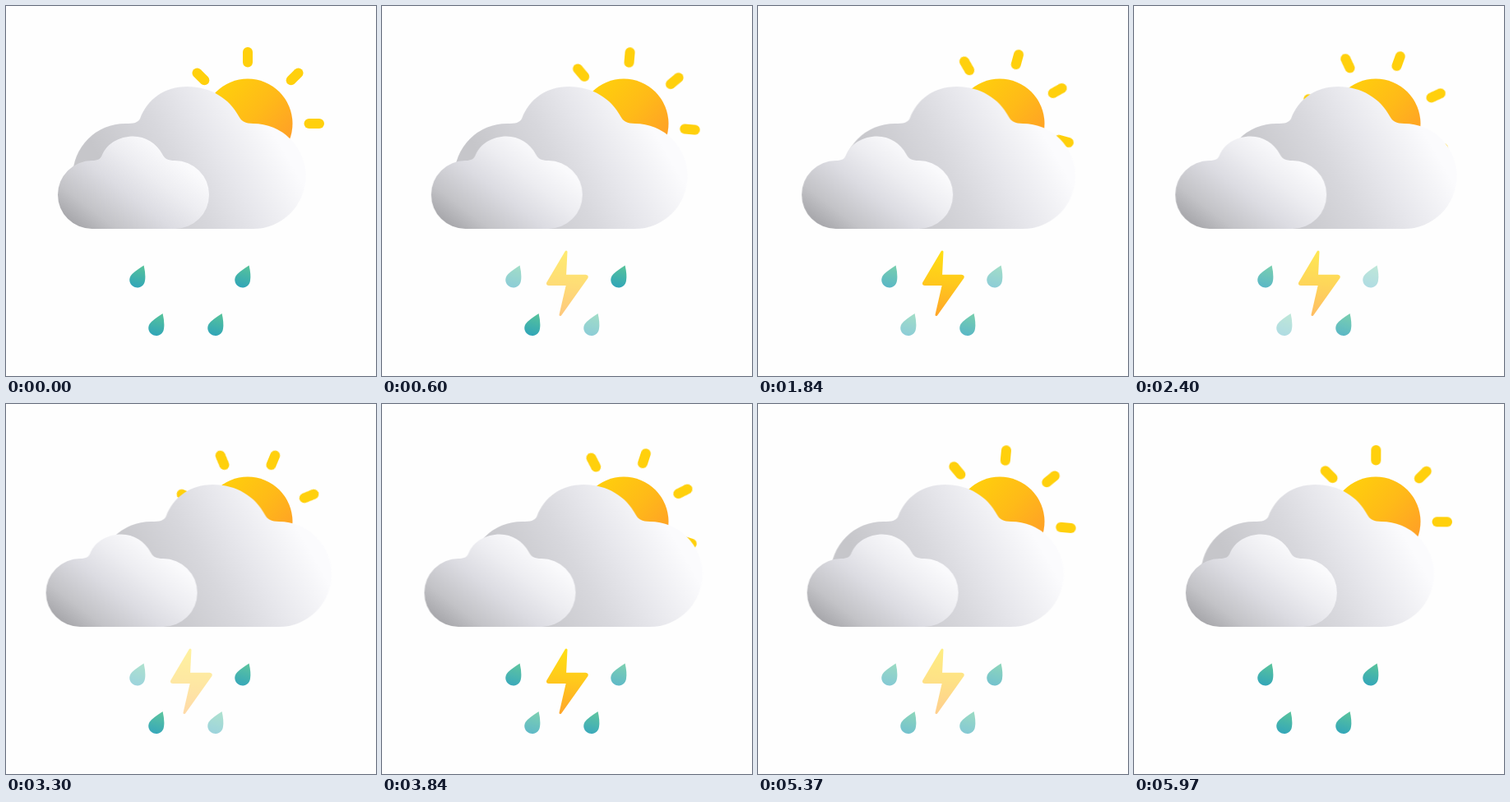
An HTML page for the animation above (6 s loop, 450 by 450 pixels).

```html
<!DOCTYPE html>
<html lang="en">
<head>
<meta charset="utf-8">
<title>Thunderstorm with sun</title>
<style>
  html, body { margin: 0; width: 100%; height: 100%; overflow: hidden; background: #fefefe; }
  svg { display: block; width: 100%; height: 100%; }
  #rays { transform-origin: 294px 143px; }
</style>
</head>
<body>
<svg viewBox="0 0 450 450">
  <defs>
    <linearGradient id="sunFill" gradientUnits="userSpaceOnUse" x1="262" y1="95" x2="346" y2="168">
      <stop offset="0" stop-color="#ffcf0c"/>
      <stop offset=".5" stop-color="#ffba18"/>
      <stop offset="1" stop-color="#ff9d28"/>
    </linearGradient>
    <linearGradient id="backFill" gradientUnits="userSpaceOnUse" x1="100" y1="165" x2="272" y2="65">
      <stop offset="0" stop-color="#c6c6ca"/>
      <stop offset=".4" stop-color="#d8d8dd"/>
      <stop offset=".65" stop-color="#e7e7ec"/>
      <stop offset="1" stop-color="#fbfbfd"/>
    </linearGradient>
    <linearGradient id="frontFill" gradientUnits="userSpaceOnUse" x1="85" y1="268" x2="170" y2="157">
      <stop offset="0" stop-color="#a6a6aa"/>
      <stop offset=".2" stop-color="#c3c3c7"/>
      <stop offset=".5" stop-color="#dcdce2"/>
      <stop offset=".75" stop-color="#ededf1"/>
      <stop offset="1" stop-color="#fafafc"/>
    </linearGradient>
    <linearGradient id="boltFill" gradientUnits="userSpaceOnUse" x1="225" y1="297" x2="220" y2="377">
      <stop offset="0" stop-color="#ffe014"/>
      <stop offset=".5" stop-color="#ffc81c"/>
      <stop offset="1" stop-color="#ffa52a"/>
    </linearGradient>
    <linearGradient id="dropFill" x1=".6" y1="0" x2=".4" y2="1">
      <stop offset="0" stop-color="#56c29c"/>
      <stop offset="1" stop-color="#30a5b8"/>
    </linearGradient>
    <path id="drop" fill="url(#dropFill)" d="M167.6 315.6Q170.2 327 169 334A9.4 9.4 0 1 1 151.6 328.2Q154.5 324 167.6 315.6Z"/>
  </defs>

  <g id="rays" stroke="#ffd00c" stroke-width="12" stroke-linecap="round"></g>
  <circle cx="294" cy="143" r="54.5" fill="url(#sunFill)"/>

  <path id="back" fill="url(#backFill)" d="M145 271A64 64 0 0 1 145 143C156 143 160 142 163 137C172 113 193 98 220 98C249 98 272 113 283 134C286 140 291 143 300.5 143A64 64 0 0 1 300.5 271Z"/>
  <path id="front" fill="url(#frontFill)" d="M104.5 271A41.5 41.5 0 0 1 104.5 188C112 188 115 186 117 181C123 167 138 158.5 154.5 158.5C170 158.5 183 167 190 180C193 186 197 188 205.5 188A41.5 41.5 0 0 1 205.5 271Z"/>

  <path id="bolt" fill="url(#boltFill)" stroke="url(#boltFill)" stroke-width="3" stroke-linejoin="round"
        d="M224 299L201.5 337Q201 338.5 203 338.5H225.5L217 375.5L249 330.5Q250 328.5 247.5 328.3H222.5Z"/>
  <g id="outer">
    <use href="#drop"/>
    <use href="#drop" x="95" y="58.5"/>
  </g>
  <g id="inner">
    <use href="#drop" x="128"/>
    <use href="#drop" x="23" y="58.5"/>
  </g>
</svg>
<script>
  const LOOP = 6000;
  const get = id => document.getElementById(id);

  for (let angle = 0; angle < 360; angle += 45) {
    const ray = document.createElementNS("http://www.w3.org/2000/svg", "path");
    ray.setAttribute("d", "M294 56V68.5");
    ray.setAttribute("transform", `rotate(${angle} 294 143)`);
    get("rays").append(ray);
  }

  const play = (id, frames) =>
    get(id).animate(frames, { duration: LOOP, iterations: Infinity }).startTime = 0;

  const sway = (id, rest, far) =>
    play(id, [rest, far, rest].map(transform => ({ transform })));

  const fade = (id, steps) =>
    play(id, steps.map(([ms, opacity]) => ({ offset: ms / LOOP, opacity })));

  sway("rays", "rotate(0deg)", "rotate(25deg)");
  sway("back", "translateX(0px)", "translateX(35px)");
  sway("front", "translateX(0px)", "translateX(-16px)");

  fade("bolt", [[0, 0], [1000, 1], [2000, 1], [3150, .22], [3800, 1], [4900, 1], [5900, 0], [6000, 0]]);
  fade("outer", [[0, 1], [1000, .25], [2150, 1], [3050, .25], [3900, 1], [4900, .28], [6000, 1]]);
  fade("inner", [[0, 1], [1150, 1], [2250, .28], [3350, 1], [4750, .35], [6000, 1]]);
</script>
</body>
</html>
```
